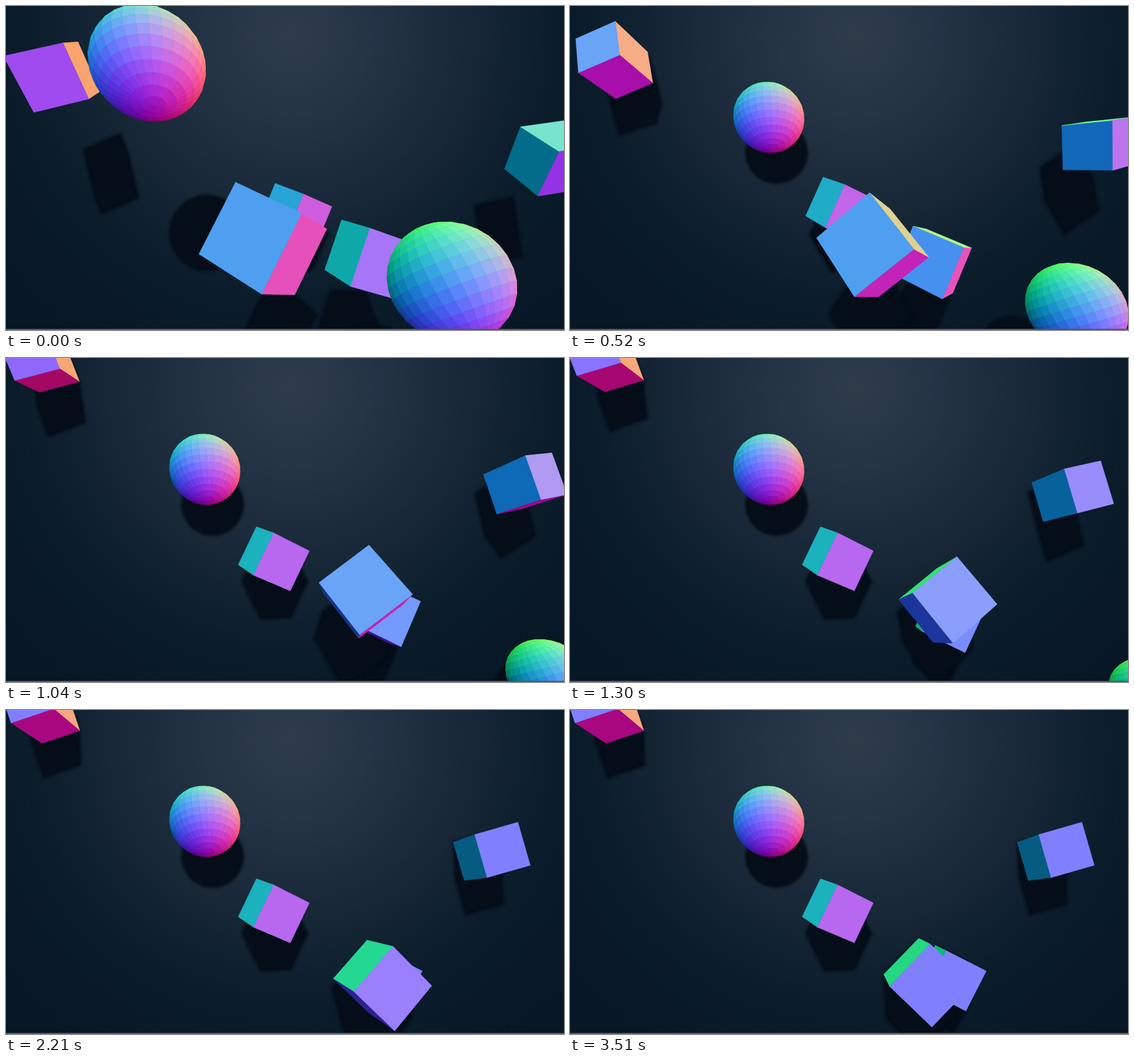
An HTML page with a canvas that plays this animation: 952 px wide and 554 px high, repeating every 3640 ms.

```html
<!DOCTYPE html>
<html lang="en">
<head>
<meta charset="utf-8">
<title>Falling solids</title>
<style>
html, body { margin: 0; width: 100%; height: 100%; overflow: hidden; background: #081827; }
canvas { display: block; }
</style>
</head>
<body>
<canvas id="stage" width="952" height="554"></canvas>
<script>
const ctx = document.getElementById('stage').getContext('2d');
const W = 952, H = 554, LOOP = 3640, STEP = 130, BEAT = 520;
const CX = 476, CY = 330, EYE = 600;

// A solid sinks steadily by `drop` until `land`, then stays in touch with the floor.
// Its path has one pose per beat: floor x, y, turn in degrees, lean of the top face x, y.
const cube = (half, drop, land, path) => ({ half, drop, land, path, beat: BEAT });
const ball = (drop, land, beat, path) => ({ r: 53.5, drop, land, path, beat });
const pose = (x, y, turn, nx = 0, ny = 0) => ({ p: [x, y], axes: axesOf(turn, nx, ny) });

const bodies = [
  cube(34, 86, 520, [
    pose(-301, -163, -17, .25, .41), pose(-368, -217, -21, -.18, -.29),
    pose(-388, -305, -17.5, .13, .18), pose(-393, -316, -18.5)]),
  cube(34, 0, 1, [
    pose(16, 25, 22, .62, .26), pose(-12, 15, 25, .52, .21), pose(-19, 11, 26, .44, .19)]),
  cube(34, 76, 760, [
    pose(360, -56, -8.7, .16, .6), pose(373, -82, -12, .48, .08),
    pose(374, -105, -11.3, .39, -.21), pose(329, -80.5, -16)]),
  cube(34, 124, 1480, [
    pose(103, 72.5, 19.4, .31, .08), pose(113.5, 83, 23, -.45, -.13),
    pose(145, 92.5, 25, -.1, -.21), pose(162, 118, 27)]),
  cube(43, 145, 1400, [
    pose(-21, 47, 24.8, -.39, -.25), pose(32, 62, 53.5, -.39, -.25),
    pose(113, 62, 52.5, -.18, -.29), pose(176, 92, 51, .35, -.17),
    pose(156, 123.5, 44.5, .27), pose(120, 121, 44)]),
  ball(201, 500, BEAT, [pose(-132.5, -131, 10, .25, .85), pose(-123.5, -126, -3, .15, .92)]),
  ball(224, 1040, 3 * BEAT, [pose(149, 74.5, 15, .3, .85), pose(534, 252, -15, .2, .88)])
];

function dot(a, b) { return a[0] * b[0] + a[1] * b[1] + a[2] * b[2]; }
function cross(a, b) {
  return [a[1] * b[2] - a[2] * b[1], a[2] * b[0] - a[0] * b[2], a[0] * b[1] - a[1] * b[0]];
}
function mul(a, k) { return a.map(v => v * k); }
function mix(a, b, k) { return a.map((v, i) => v + (b[i] - v) * k); }
function unit(a) { return mul(a, 1 / Math.hypot(...a)); }
function place(p, axes, a, b, c) {
  return p.map((v, i) => v + axes[0][i] * a + axes[1][i] * b + axes[2][i] * c);
}

function axesOf(turn, nx, ny) {
  const n = [nx, ny, Math.sqrt(1 - nx * nx - ny * ny)];
  const c = Math.cos(turn * Math.PI / 180), s = Math.sin(turn * Math.PI / 180);
  const u = unit([c, s, -(c * nx + s * ny) / n[2]]);
  return [u, cross(n, u), n];
}

function stateAt(b, t) {
  const last = b.path.length - 1;
  const s = Math.min(t / b.beat, last), i = Math.min(Math.floor(s), last - 1);
  const A = b.path[i], B = b.path[i + 1], k = s - i;
  const n = unit(mix(A.axes[2], B.axes[2], k));
  const w = mix(A.axes[0], B.axes[0], k), off = dot(n, w);
  const u = unit(w.map((v, j) => v - n[j] * off));
  const axes = [u, cross(n, u), n];
  const lift = b.drop * Math.max(0, 1 - t / b.land);
  const touch = b.r || b.half * axes.reduce((sum, a) => sum + Math.abs(a[2]), 0);
  return { b, axes, lift, p: [...mix(A.p, B.p, k), touch + lift] };
}

const project = ([x, y, h]) => {
  const s = EYE / (EYE - h);
  return [CX + x * s, CY + y * s];
};
const facing = (n, p) => dot(n, [-p[0], -p[1], EYE - p[2]]) > 0;
// Colour follows the direction a face looks in.
const tint = n => `rgb(${[n[0], -n[1], n[2]].map(v => Math.round((v + 1) * 127.5)).join()})`;

function poly(pts, colour) {
  ctx.beginPath();
  pts.forEach(p => ctx.lineTo(p[0], p[1]));
  ctx.closePath();
  ctx.fillStyle = ctx.strokeStyle = colour;
  ctx.lineWidth = .5;
  ctx.fill();
  ctx.stroke();
}

function hull(pts) {
  pts.sort((a, b) => a[0] - b[0] || a[1] - b[1]);
  const chain = list => {
    const out = [];
    for (const p of list) {
      while (out.length > 1) {
        const [a, b] = out.slice(-2);
        if ((b[0] - a[0]) * (p[1] - a[1]) - (b[1] - a[1]) * (p[0] - a[0]) > 0) break;
        out.pop();
      }
      out.push(p);
    }
    return out.slice(0, -1);
  };
  return chain(pts).concat(chain(pts.slice().reverse()));
}

function drawCube({ b: { half }, p, axes }) {
  for (let i = 0; i < 3; i++) for (const sign of [1, -1]) {
    const n = mul(axes[i], sign);
    const mid = place(p, [n, n, n], half, 0, 0);
    if (!facing(n, mid)) continue;
    const a = axes[(i + 1) % 3], b = axes[(i + 2) % 3];
    const pts = [[1, 1], [1, -1], [-1, -1], [-1, 1]]
      .map(([j, k]) => project(place(mid, [a, b, n], j * half, k * half, 0)));
    poly(pts, tint(n));
  }
}

function drawBall({ b: { r }, p, axes }) {
  const rows = 16, step = Math.PI / rows;
  const dir = (i, j) => {
    const s = Math.sin(i * step);
    return place([0, 0, 0], axes, s * Math.cos(j * step), s * Math.sin(j * step), Math.cos(i * step));
  };
  const at = (i, j) => dir(i, j).map((v, k) => p[k] + v * r);
  for (let i = 0; i < rows; i++) for (let j = 0; j < 2 * rows; j++) {
    const n = dir(i + .5, j + .5);
    if (!facing(n, at(i + .5, j + .5))) continue;
    poly([at(i, j), at(i, j + 1), at(i + 1, j + 1), at(i + 1, j)].map(project), tint(n));
  }
}

const SHADE = '#040d18';

function drawShadow({ b, p, axes, lift }) {
  if (b.r) {
    ctx.fillStyle = SHADE;
    ctx.beginPath();
    ctx.arc(CX + p[0], CY + p[1] + .87 * p[2] - .16 * lift, b.r + .06 * lift, 0, 7);
    ctx.fill();
    return;
  }
  const pts = [];
  for (let i = 0; i < 8; i++) {
    const [x, y, h] = place(p, axes, ...[1, 2, 4].map(bit => i & bit ? b.half : -b.half));
    pts.push([CX + x + .03 * h, CY + y + .88 * h]);
  }
  poly(hull(pts), SHADE);
}

const glow = ctx.createRadialGradient(487, 50, 0, 487, 50, 640);
[[0, '#2e3c4a'], [.2, '#253446'], [.4, '#1b2b3b'], [.7, '#0b1c2b'], [1, '#071726']]
  .forEach(([at, colour]) => glow.addColorStop(at, colour));

function render(t) {
  ctx.fillStyle = glow;
  ctx.fillRect(0, 0, W, H);
  const scene = bodies.map(b => stateAt(b, t)).sort((a, c) => a.p[2] - c.p[2]);
  ctx.filter = 'blur(2px)';
  scene.forEach(drawShadow);
  ctx.filter = 'none';
  scene.forEach(s => s.b.r ? drawBall(s) : drawCube(s));
  ctx.fillStyle = '#55585b';
  ctx.fillRect(0, 552, W, 2);
}

const start = performance.now();
let shown = -1;
function tick() {
  const t = Math.floor((performance.now() - start) % LOOP / STEP) * STEP;
  if (t !== shown) render(shown = t);
  requestAnimationFrame(tick);
}
tick();
</script>
</body>
</html>
```
